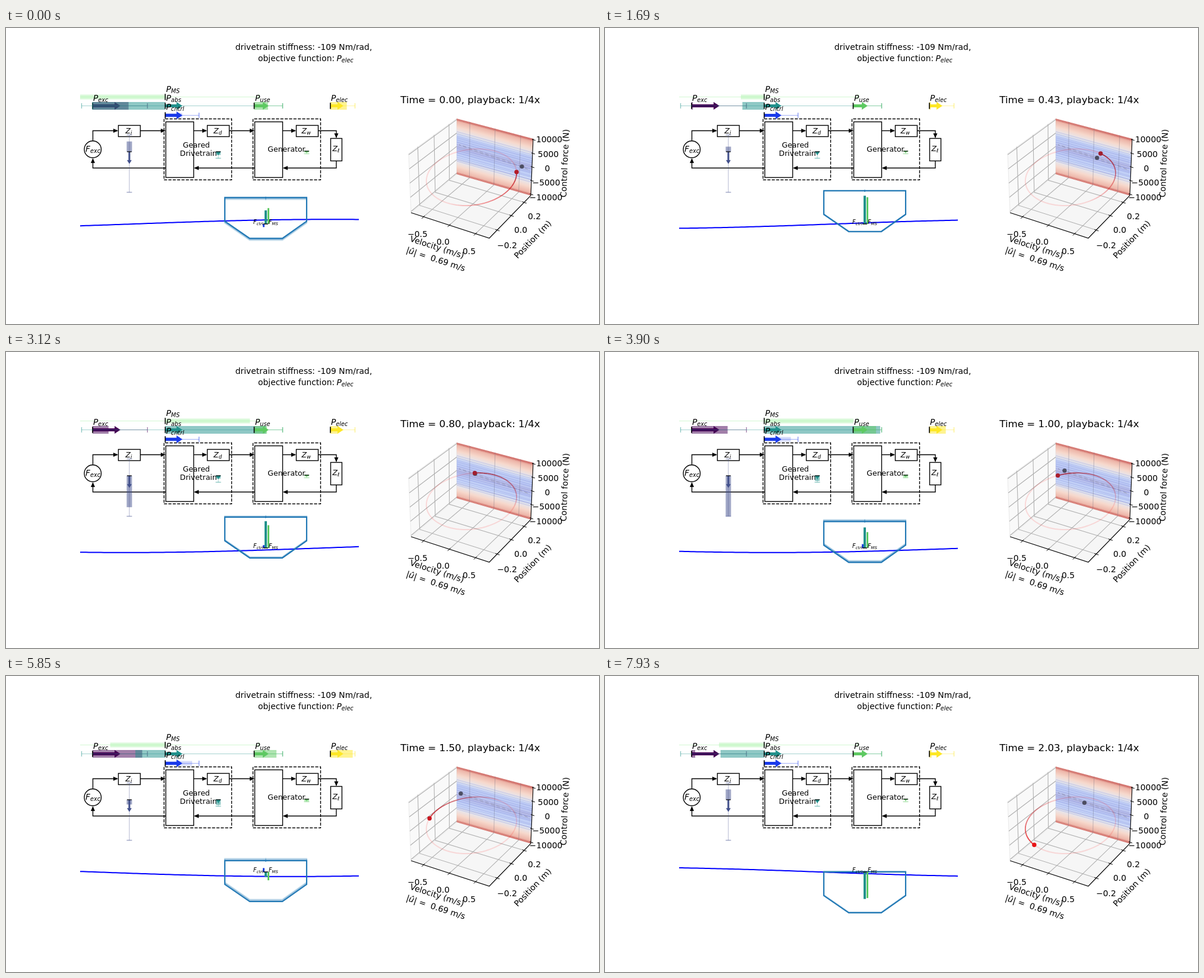
Recreate the animation shown at these times as an HTML page with a canvas. Size 1000 by 500 pixels, loop 8 s.

```html
<!DOCTYPE html>
<html lang="en">
<head>
<meta charset="utf-8">
<title>Drivetrain power flow</title>
<style>
  html, body { margin: 0; width: 100%; height: 100%; overflow: hidden; background: #fff; }
  canvas { display: block; width: 1000px; height: 500px; }
</style>
</head>
<body>
<canvas id="stage" width="1000" height="500"></canvas>
<script>
const ctx = document.getElementById('stage').getContext('2d');
const FONT = '"DejaVu Sans", sans-serif';
const OMEGA = 0.6 * Math.PI;
const STEP_MS = 130, LOOP_MS = 8000, FPS = 30;
const { cos, sin, PI } = Math;

// ---------- helpers ----------
function path(points, stroke, width = 1.39, close = false) {
  ctx.beginPath();
  points.forEach(([x, y]) => ctx.lineTo(x, y));
  if (close) ctx.closePath();
  ctx.strokeStyle = stroke;
  ctx.lineWidth = width;
  ctx.stroke();
}

function polygon(points, fill) {
  ctx.beginPath();
  points.forEach(([x, y]) => ctx.lineTo(x, y));
  ctx.closePath();
  ctx.fillStyle = fill;
  ctx.fill();
}

function disc([x, y], r, fill) {
  ctx.beginPath();
  ctx.arc(x, y, r, 0, 2 * PI);
  ctx.fillStyle = fill;
  ctx.fill();
}

function text(str, x, y, size = 13.89, align = 'center', style = '') {
  ctx.font = `${style} ${size}px ${FONT}`;
  ctx.textAlign = align;
  ctx.fillStyle = '#000';
  ctx.fillText(str, x, y);
}

function symbol(main, sub, x, y, size = 13.89) {
  text(main, x, y, size, 'left', 'italic');
  const w = ctx.measureText(main).width;
  text(sub, x + w, y + size * 0.17, size * 0.7, 'left', 'italic');
}

function at(x, y, angle, draw) {
  ctx.save();
  ctx.translate(x, y);
  ctx.rotate(angle);
  draw();
  ctx.restore();
}

const lerp = (a, b, f) => a.map((v, i) => v + (b[i] - v) * f);

// ---------- block diagram ----------
function box(x0, y0, x1, y1) {
  ctx.fillStyle = '#fff';
  ctx.fillRect(x0, y0, x1 - x0, y1 - y0);
  ctx.strokeStyle = '#000';
  ctx.lineWidth = 1.39;
  ctx.strokeRect(x0, y0, x1 - x0, y1 - y0);
}

function wire(...points) {
  path(points, '#000');
  const [[px, py], [x, y]] = points.slice(-2);
  at(x, y, Math.atan2(y - py, x - px), () => polygon([[1, 0], [-7, -3.5], [-7, 3.5]], '#000'));
}

function drawDiagram() {
  ctx.setLineDash([5.14, 2.22]);
  for (const x of [266.5, 416.5]) {
    path([[x, 256.5], [x + 114, 256.5], [x + 114, 153.5], [x, 153.5]], '#000', 1.39, true);
  }
  ctx.setLineDash([]);

  wire([146.5, 190], [146.5, 173.5], [188, 173.5]);
  wire([226, 173.5], [268, 173.5]);
  wire([316, 173.5], [338, 173.5]);
  wire([376, 173.5], [418, 173.5]);
  wire([466, 173.5], [488, 173.5]);
  wire([526, 173.5], [557, 173.5], [557, 185]);
  wire([557, 224], [557, 236.5], [468, 236.5]);
  wire([419, 236.5], [318, 236.5]);
  wire([269, 236.5], [146.5, 236.5], [146.5, 221]);

  box(189.5, 164.5, 226.5, 183.5);
  box(339.5, 164.5, 376.5, 183.5);
  box(489.5, 164.5, 526.5, 183.5);
  box(547.5, 186.5, 566.5, 224.5);
  box(269.5, 158.5, 316.5, 252.5);
  box(419.5, 158.5, 466.5, 252.5);
  ctx.beginPath();
  ctx.arc(146.3, 205, 14.3, 0, 2 * PI);
  ctx.lineWidth = 1.39;
  ctx.stroke();

  symbol('F', 'exc', 134, 209);
  symbol('Z', 'i', 201.5, 178, 12.5);
  symbol('Z', 'd', 350, 178, 12.5);
  symbol('Z', 'w', 498.5, 178, 12.5);
  symbol('Z', 'ℓ', 550.5, 208, 12.5);
  text('Geared', 321, 202, 12.5);
  text('Drivetrain', 324.5, 216, 12.5);
  text('Generator', 473, 209, 12.5);
}

// ---------- power flows: mean + amp * cos(2w(t - phase)) ----------
const flows = [
  { x: 146, y: 131.5, h: 13, mean: 46.5, amp: 46, phase: 1.333, color: '#440154' },
  { x: 268.5, y: 131.5, h: 13, mean: 28.5, amp: 169.5, phase: 0.955, color: '#21918c' },
  { x: 268.5, y: 147.5, h: 8, mean: 28.5, amp: 28.5, phase: 1.253, color: '#1a3aea', alpha: 0.18 },
  { x: 268.5, y: 116.5, h: 8, mean: 0, amp: 158, phase: 0.917, color: '#90ee90', alpha: 0.35 },
  { x: 418.5, y: 131.5, h: 13, mean: 24, amp: 24, phase: 1.243, color: '#5ec962' },
  { x: 547, y: 131.5, h: 13, mean: 21.5, amp: 20, phase: 1.333, color: '#fde725' },
  { x: 208, y: 209, h: 9, mean: 20, amp: 48.5, phase: 1.017, color: '#414f8b', down: true, head: 4 },
  { x: 358, y: 209, h: 8, mean: 5.5, amp: 5.5, phase: 1.25, color: '#21918c', down: true, head: 4 },
  { x: 507, y: 208, h: 8, mean: 2.2, amp: 2.2, phase: 1.25, color: '#5ec962', down: true, head: 3.5 }
];

function drawFlow(flow, t) {
  const { x, y, h, mean, amp, phase, color, alpha = 0.5, down, head = 6.5 } = flow;
  const value = mean + amp * cos(2 * OMEGA * (t - phase));
  at(x, y, down ? PI / 2 : 0, () => {
    ctx.globalAlpha = alpha;
    ctx.fillStyle = color;
    ctx.fillRect(0, -h / 2, value, h);
    ctx.globalAlpha = 0.5;
    path([[mean - amp, 0], [mean + amp, 0]], color, 0.8);
    for (const end of [mean - amp, mean + amp]) path([[end, -4.5], [end, 4.5]], color, 1.4);
    ctx.globalAlpha = 1;
    if (mean > 0) {
      const neck = Math.max(0, mean - head * 1.45), shaft = head * 0.38;
      polygon([[0, -shaft], [neck, -shaft], [neck, -head], [mean + 0.5, 0],
               [neck, head], [neck, shaft], [0, shaft]], color);
    }
    const tick = down ? 4 : 5.3;
    path([[0, -tick], [0, tick]], '#000', down ? 1.2 : 1.6);
  });
}

function drawFlows(t) {
  ctx.save();
  ctx.beginPath();
  ctx.rect(125, 100, 470, 190);
  ctx.clip();
  flows.forEach(flow => drawFlow(flow, t));
  ctx.restore();
  symbol('P', 'exc', 147, 123);
  symbol('P', 'MS', 270, 108);
  symbol('P', 'abs', 270, 123);
  symbol('P', 'cntrl', 270, 138);
  symbol('P', 'use', 420, 123);
  symbol('P', 'elec', 548, 123);
}

// ---------- wave and buoy ----------
function drawWave(t) {
  const points = [];
  for (let x = 125; x <= 595; x += 5) {
    points.push([x, 331 + 7.75 * cos(OMEGA / 400 * (x - 282) - OMEGA * (t - 1))]);
  }
  path(points, '#00f', 2);
}

function drawBuoy(t) {
  for (const [lag, alpha] of [[2, 0.25], [1, 0.45], [0, 1]]) {
    const top = 303.2 - 28.7 * cos(OMEGA * (t - lag / FPS - 0.5));
    ctx.globalAlpha = alpha;
    path([[369, top], [507, top], [507, top + 40], [466, top + 69],
          [411, top + 69], [369, top + 40]], '#1f77b4', 2.1, true);
    path([[438, top - 1.5], [438, top + 2]], '#1f77b4', 1);
  }
  ctx.globalAlpha = 1;
}

function drawForces(t) {
  const bars = [
    [433, 3, 7.3 * sin(OMEGA * (t - 0.43)), '#2244e0'],
    [436, 4, 49.5 * cos(OMEGA * (t - 0.578)), '#21918c'],
    [441, 3, 45.5 * cos(OMEGA * (t - 0.5)), '#5ec962']
  ];
  for (const [x, w, length, color] of bars) {
    ctx.fillStyle = color;
    ctx.fillRect(x, 331, w, -length);
  }
  path([[434, 331], [442, 331]], '#000', 1.4);
  symbol('F', 'ctrl', 417, 331, 9.7);
  symbol('F', 'MS', 443, 331, 9.7);
}

// ---------- 3D phase plot ----------
const floor = { left: [683, 312], back: [760, 247], right: [885, 283], front: [815, 355] };
const upper = { left: [679, 212], back: [760, 153], right: [889, 187] };
const velTicks = [0.16, 0.49, 0.825], posTicks = [0.19, 0.53, 0.84], zTicks = [0.02, 0.26, 0.5, 0.74, 0.98];

function drawGrid() {
  polygon([floor.left, floor.back, upper.back, upper.left], '#f9f9f9');
  polygon([floor.left, floor.back, floor.right, floor.front], '#f6f6f6');
  const grey = '#b0b0b0';
  path([upper.left, upper.back, floor.back, floor.left], '#e4e4e4', 0.8, true);
  for (const f of velTicks) {
    const rear = lerp(floor.back, floor.right, f + 0.012);
    path([lerp(floor.left, floor.front, f), rear, lerp(upper.back, upper.right, f + 0.012)], grey, 1.1);
  }
  for (const f of posTicks) {
    const side = lerp(floor.left, floor.back, f);
    path([lerp(floor.front, floor.right, f), side, lerp(upper.left, upper.back, f)], grey, 1.1);
  }
  for (const f of zTicks) {
    path([lerp(floor.left, upper.left, f), lerp(floor.back, upper.back, f),
          lerp(floor.right, upper.right, f)], grey, 1.1);
  }
}

function drawWall() {
  const { back, right } = floor;
  const half = ['#d87c74', '#ebad9e', '#f5d3c5', '#e2e2ea', '#c3d4f8', '#b1c1f3', '#b3b8e5'];
  const stops = [0, 0.05, 0.15, 0.24, 0.31, 0.4, 0.5];
  ctx.save();
  ctx.beginPath();
  [upper.back, upper.right, right, back].forEach(([x, y]) => ctx.lineTo(x, y));
  ctx.clip();
  ctx.save();
  ctx.transform(1, 0.276, 0, 1, 760, 153);
  const fill = ctx.createLinearGradient(0, 0, 0, 95);
  half.forEach((c, i) => {
    fill.addColorStop(stops[i], c);
    fill.addColorStop(1 - stops[i], c);
  });
  ctx.globalAlpha = 0.87;
  ctx.fillStyle = fill;
  ctx.fillRect(0, -4, 130, 103);
  ctx.globalAlpha = 1;
  for (let i = 0; i < 18; i++) {
    const y = 22 + i * 3 + 1.2 * sin(i * 7.3);
    path([[0, y], [130, y + 1.5 * sin(i * 3.1)]], 'rgba(85,90,200,.34)', 0.7);
  }
  ctx.restore();
  ctx.setLineDash([1, 1.4]);
  path([upper.back, upper.right], 'rgba(190,45,45,.5)', 7);
  path([back, right], 'rgba(190,45,45,.5)', 7);
  ctx.setLineDash([]);
  for (const f of velTicks) {
    path([lerp(back, right, f + 0.012), lerp(upper.back, upper.right, f + 0.012)], 'rgba(120,120,140,.35)', 1);
  }
  ctx.restore();
}

function orbit(a) {
  return [785 + 76 * cos(a) + sin(a) - 2 * sin(2 * a),
          250.7 - 6 * cos(a) - 47.5 * sin(a) - 1.5 * cos(2 * a)];
}

function shadow(a) {
  const x = 822.7 + 47.3 * cos(a) - 34.8 * sin(a);
  return [x, 199 + 0.34 * (x - 767) - 1.5 * sin(a)];
}

// Darker where the curve passes in front of the wall.
function orbitColor(a, alpha = 1) {
  const u = (1 - cos(a - 1.1)) / 2;
  return `rgba(${158 + 77 * u},${30 - 10 * u},${48 - 26 * u},${alpha})`;
}

function loop(curve) {
  return Array.from({ length: 91 }, (_, i) => curve(i * PI / 45));
}

function drawOrbit(t) {
  const angle = OMEGA * t;
  ctx.setLineDash([6, 4]);
  path(loop(shadow), 'rgba(110,110,130,.35)', 1);
  ctx.setLineDash([]);
  path(loop(orbit), 'rgba(255,0,0,.13)', 2);
  const count = 40, span = 2;
  for (let i = 0; i < count; i++) {
    const a = angle - span * i / count;
    path([orbit(a), orbit(a - span / count)], orbitColor(a, 0.95 * (1 - i / count)), 1.6);
  }
  disc(shadow(angle), 3.6, 'rgba(60,60,75,.85)');
  disc(orbit(angle), 3.7, orbitColor(angle));
}

function drawAxes() {
  path([floor.left, floor.front, floor.right, upper.right], '#000', 1.1);
  const middle = (str, x, y) => text(str, x, y + 5);
  velTicks.forEach((f, i) => {
    const [x, y] = lerp(floor.left, floor.front, f);
    path([[x + 2, y - 2], [x - 3, y + 3]], '#000', 1);
    middle(['−0.5', '0.0', '0.5'][i], [694, 737, 781][i], [348, 361, 377][i]);
  });
  posTicks.forEach((f, i) => {
    const [x, y] = lerp(floor.front, floor.right, f);
    path([[x - 3, y - 1], [x + 4, y + 1.5]], '#000', 1);
    middle(['−0.2', '0.0', '0.2'][i], [845, 868, 891][i], [367, 341, 318][i]);
  });
  zTicks.forEach((f, i) => {
    const [x, y] = lerp(floor.right, upper.right, f);
    path([[x - 2, y - 1], [x + 4, y + 1]], '#000', 1);
    middle(['−10000', '−5000', '0', '5000', '10000'][i], [910.5, 911, 913, 914.5, 916][i], 285.5 - 24.3 * i);
  });
  at(727, 370, 0.315, () => text('Velocity (m/s)', 0, 5));
  at(724, 390, 0.315, () => {
    text('|', -51, 5, 13.89, 'left');
    text('û', -46.5, 5, 13.89, 'left', 'italic');
    text('| =  0.69 m/s', -37.5, 5, 13.89, 'left');
  });
  at(888, 357, -0.8, () => text('Position (m)', 0, 5));
  at(942, 228.5, -1.53, () => text('Control force (N)', 0, 5));
}

// ---------- frame ----------
function render(ms) {
  const t = Math.floor(ms % LOOP_MS / STEP_MS) / FPS;
  ctx.fillStyle = '#fff';
  ctx.fillRect(0, 0, 1000, 500);

  text('drivetrain stiffness: -109 Nm/rad,', 502, 37);
  text('objective function: ', 425, 56, 13.89, 'left');
  symbol('P', 'elec', 557.5, 56);

  drawDiagram();
  drawFlows(t);
  drawWave(t);
  drawBuoy(t);
  drawForces(t);

  drawGrid();
  drawWall();
  drawOrbit(t);
  drawAxes();
  text(`Time = ${t.toFixed(2)}, playback: 1/4x`, 783, 127, 16.67);
}

const start = performance.now();
function tick() {
  render(performance.now() - start);
  requestAnimationFrame(tick);
}
tick();
</script>
</body>
</html>
```
